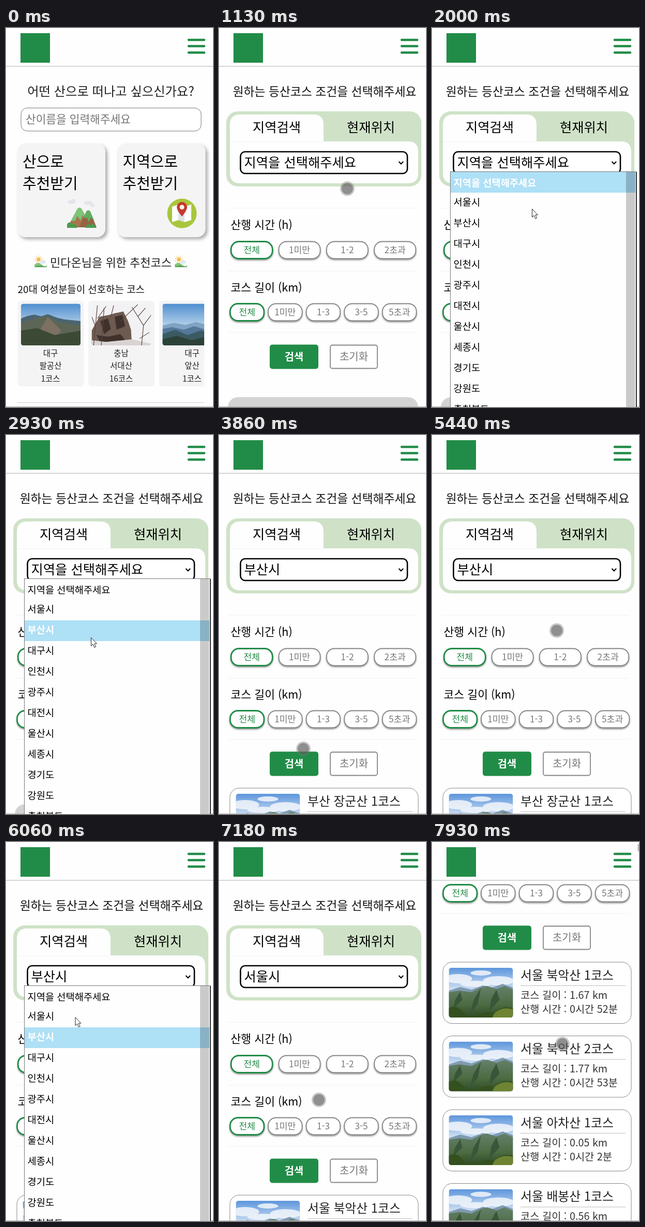
An HTML page that plays this animation: 400x732 px, repeating every 7990 ms.

```html
<!DOCTYPE html>
<html lang="ko">
<head>
<meta charset="utf-8">
<title>등산코스 추천</title>
<style>
  html, body { margin: 0; width: 100%; height: 100%; overflow: hidden; background: #fefefe; }
  #stage { display: block; width: 100vw; height: 100vh; }
  text { font-family: "Noto Sans CJK KR", "Noto Sans CJK", "Noto Sans", sans-serif; white-space: pre; }
  .soft { filter: drop-shadow(0 2px 1.5px rgba(0, 0, 0, .4)); }
  .raised { filter: drop-shadow(4px 4px 3px rgba(0, 0, 0, .32)); }
</style>
</head>
<body>
<svg id="stage" viewBox="0 0 400 732"></svg>
<script>
const LOOP = 7990;
const GREEN = '#218c47';
const stage = document.getElementById('stage');

// Text is placed by the vertical centre of its glyphs.
const text = (x, cy, size, str, { at = 'start', weight = 400, fill = '#111' } = {}) =>
  `<text x="${x}" y="${(cy + size * .38).toFixed(1)}" font-size="${size}" text-anchor="${at}" font-weight="${weight}" fill="${fill}">${str}</text>`;
const rect = (x, y, w, h, r, attrs) =>
  `<rect x="${x}" y="${y}" width="${w}" height="${h}" rx="${r}" ${attrs}/>`;
const line = (x1, y, x2, color, width = 1) =>
  `<path d="M${x1} ${y}H${x2}" stroke="${color}" stroke-width="${width}"/>`;
const shape = (d, fill) => `<path d="${d}" fill="${fill}"/>`;
const group = (id, body) => `<g id="${id}">${body}</g>`;
const photo = (x, y, w, h, body) =>
  `<svg x="${x}" y="${y}" width="${w}" height="${h}" viewBox="0 0 124 96" preserveAspectRatio="none"><g clip-path="url(#round)">${body}</g></svg>`;

const defs = `<defs>
  <clipPath id="round"><rect width="124" height="96" rx="5"/></clipPath>
  <linearGradient id="sky" x2="0" y2="1"><stop stop-color="#5d96dc"/><stop offset=".5" stop-color="#dfeaf6"/></linearGradient>
  <linearGradient id="ridge" x2="0" y2="1"><stop stop-color="#64806a"/><stop offset=".6" stop-color="#4c6b41"/><stop offset="1" stop-color="#2f4a25"/></linearGradient>
  <linearGradient id="haze" x2="0" y2="1"><stop stop-color="#4f8fd0"/><stop offset=".55" stop-color="#b9d3ea"/></linearGradient>
</defs>`;

const valley = rect(0, 0, 124, 96, 0, 'fill="url(#sky)"') +
  `<g fill="#f3f6fb" opacity=".85"><ellipse cx="18" cy="21" rx="27" ry="9"/><ellipse cx="62" cy="10" rx="20" ry="5"/>
   <ellipse cx="96" cy="25" rx="30" ry="9"/><ellipse cx="52" cy="31" rx="30" ry="6"/></g>` +
  shape('M0 44L22 37 44 42 66 34 84 38 104 31 124 38V96H0Z', '#7f9bb0') +
  shape('M0 47L20 44 44 47 62 38 74 35 92 41 108 35 124 42V96H0Z', 'url(#ridge)') +
  shape('M62 39L48 62 40 90 56 70ZM92 42L82 60 78 84 98 62ZM22 46L12 62 8 80 26 62Z', '#39563a') +
  shape('M0 78Q14 70 26 84T58 90 88 88Q100 72 124 78V96H0Z', '#34501f') +
  shape('M88 88Q102 74 124 80V96H84Z', '#6f8433');

const brownRidge = rect(0, 0, 124, 96, 0, 'fill="url(#haze)"') +
  shape('M0 34L14 28 28 25 42 29 56 24 74 32 90 36 124 40V96H0Z', '#4b6470') +
  shape('M0 44L30 34 52 28 78 42 124 50V96H0Z', '#5d6656') +
  shape('M40 60L56 30 84 62 70 80Z', '#7c7162') +
  shape('M0 62L34 56 70 72 124 62V96H0Z', '#3c4a35');

const rock = rect(0, 0, 124, 96, 0, 'fill="#f2f1f3"') +
  shape('M0 62L16 30 36 26 48 22 66 18 76 40 82 60 84 96H0Z', '#6d5a50') +
  shape('M18 40L34 34 40 58 26 70ZM48 30L64 26 70 52 52 60ZM10 72L34 76 60 70 74 90 20 94Z', '#3f312c') +
  shape('M0 84L30 88 84 82 124 92V96H0Z', '#d9d3d2') +
  `<path d="M4 96L12 4M12 34L30 6M8 52L0 30M20 96L26 10M60 40L96 2M104 96L108 50 84 8M108 50L124 26M96 30L112 10M100 80L120 66M40 30L46 4"
    fill="none" stroke="#5a463f" stroke-width="1.3"/>`;

const blueRidge = rect(0, 0, 124, 96, 0, 'fill="url(#haze)"') +
  shape('M0 50L24 44 48 49 70 42 96 50 124 44V96H0Z', '#7fa3c2') +
  shape('M0 58L20 54 44 60 66 52 90 60 124 54V96H0Z', '#54789a') +
  shape('M0 70L26 60 52 72 80 62 124 74V96H0Z', '#3b5a62') +
  shape('M0 82L30 74 60 84 90 76 124 84V96H0Z', '#2c4238');

// Home page
const weatherIcon = x => `<g transform="translate(${x} 440)">
  <circle cx="8" cy="7" r="6.5" fill="none" stroke="#f7d58a" stroke-width="2" stroke-dasharray="2 2"/>
  <circle cx="8" cy="7" r="4" fill="#f6bd4f"/>
  ${shape('M11 13a3 3 0 0 1 3-4 4 4 0 0 1 7 2 2.500 2.500 0 0 1 0 4H12Z', '#dfe9f2')}
  ${shape('M0 22V17Q7 10 14 17T24 17V22Z', '#86c57a')}${shape('M0 22Q8 15 24 22Z', '#5aa55b')}</g>`;

const peakIcon = `<g transform="translate(117 329)">
  <g fill="#e3e5ea"><ellipse cx="10" cy="7" rx="8" ry="3.500"/><ellipse cx="13" cy="4" rx="4" ry="3"/>
  <ellipse cx="42" cy="9" rx="9" ry="4"/><ellipse cx="50" cy="14" rx="5" ry="3"/></g>
  ${shape('M2 56L20 22Q25 14 30 22L48 56Z', '#a9754f')}${shape('M24 56L38 26Q42 20 46 26L58 56Z', '#976443')}
  ${shape('M9 43L20 22Q25 14 30 22L37 38 31 33 27 43 21 34 16 44Z', '#7cc576')}
  ${shape('M33 38L38 26Q42 20 46 26L53 42 47 37 43 46 39 37Z', '#5faf62')}
  ${shape('M1 57V50Q6 42 12 51 17 45 21 57ZM36 57Q40 46 46 52 52 44 57 57Z', '#4d9a50')}</g>`;

const mapIcon = `<circle cx="340" cy="358" r="28.500" fill="#a8c63d"/>
  ${shape('M321 345L333 341V371L321 375Z M345 345L358 341V371L345 375Z', '#fff')}${shape('M333 341L345 345V375L333 371Z', '#dde3e8')}
  ${shape('M340 364Q330 352 330 346A10 10 0 0 1 350 346Q350 352 340 364Z', '#c8372d')}
  <circle cx="340" cy="346" r="4.500" fill="#f7f1ee"/>`;

const bigCard = (x, title) => rect(x, 223, 170.5, 181, 16, 'fill="#f4f4f4" class="raised"') +
  text(x + 10.5, 258, 29, title, { weight: 500, fill: '#000' }) +
  text(x + 10.5, 300, 29, '추천받기', { weight: 500, fill: '#000' });

const courseCard = (x, picture, labels) => rect(x, 527, 128, 165, 6, 'fill="#f4f4f4"') +
  photo(x + 6.5, 532.5, 115, 80.5, picture) +
  labels.map((s, i) => text(x + 63.5, 628 + i * 24.5, 15.5, s, { at: 'middle', fill: '#222' })).join('');

const home = group('home',
  text(202.5, 122, 24.3, '어떤 산으로 떠나고 싶으신가요?', { at: 'middle', fill: '#222' }) +
  rect(29, 154.5, 348, 44.5, 12, 'fill="#fff" stroke="#777"') +
  text(38, 176, 21.4, '산이름을 입력해주세요', { weight: 300, fill: '#757575' }) +
  bigCard(21.5, '산으로') + bigCard(215, '지역으로') + peakIcon + mapIcon +
  weatherIcon(55) + weatherIcon(326) +
  text(202.5, 453, 22, '민다온님을 위한 추천코스', { at: 'middle', fill: '#222' }) +
  text(22.5, 505, 18.9, '20대 여성분들이 선호하는 코스') +
  `<svg width="383" height="732">${
    courseCard(22.5, brownRidge, ['대구', '팔공산', '1코스']) +
    courseCard(159, rock, ['충남', '서대산', '16코스']) +
    courseCard(296, blueRidge, ['대구', '앞산', '1코스'])}</svg>` +
  line(22, 723.5, 383, '#ccc'));

// Search page
const chips = (xs, y, w, labels) => labels.map((label, i) => {
  const stroke = i ? 'stroke="#858585" stroke-width="1.800"' : `stroke="${GREEN}" stroke-width="2.800"`;
  return rect(xs + i * (w.pitch), y, w.size, 33, 15, `fill="#fff" ${stroke} class="soft"`) +
    text(xs + i * w.pitch + w.size / 2, y + 15.5, 17.2, label,
      { at: 'middle', weight: i ? 400 : 500, fill: i ? '#777' : GREEN });
}).join('');

const resultCard = ([title, length, time], i) => `<g transform="translate(0 ${682 + i * 142.5})">` +
  rect(21, 0, 364, 118.5, 18, 'fill="#fff" stroke="#888"') +
  photo(32.5, 11, 124, 96, valley) +
  text(171, 24.5, 23.8, title, { fill: '#222' }) + line(171, 45.5, 374, '#bbb') +
  text(171, 63, 19.8, `코스 길이 : ${length} km`, { weight: 300, fill: '#333' }) +
  text(171, 90, 19.8, `산행 시간 : 0시간 ${time}분`, { weight: 300, fill: '#333' }) + '</g>';

const busan = [['부산 장군산 1코스', '0.05', 2], ['부산 천마산 1코스', '1.08', 33]];
const seoul = [['서울 북악산 1코스', '1.67', 52], ['서울 북악산 2코스', '1.77', 53],
  ['서울 아차산 1코스', '0.05', 2], ['서울 배봉산 1코스', '0.56', 17]];
const regions = ['지역을 선택해주세요', '서울시', '부산시', '대구시', '인천시', '광주시',
  '대전시', '울산시', '세종시', '경기도', '강원도', '충청북도'];
const selectLabel = i => group('select' + i, text(48.5, 259, 25.3, regions[i], { weight: 500, fill: '#000' }));

const search = group('search', group('page',
  text(204, 122, 22.8, '원하는 등산코스 조건을 선택해주세요', { at: 'middle', weight: 500 }) +
  rect(14, 161, 377, 145, 22, 'fill="#cfe2c7"') +
  shape('M21 219V187Q21 167 41 167H182Q202 167 202 187V219H365Q385 219 385 239V280Q385 300 365 300H41Q21 300 21 280Z', '#fefefe') +
  line(21, 219.5, 202, '#f3f3f3') +
  text(111.5, 191, 25.3, '지역검색', { at: 'middle', weight: 500, fill: '#000' }) +
  text(293.5, 191, 25.3, '현재위치', { at: 'middle', weight: 500, fill: '#000' }) +
  rect(41.5, 239, 322.5, 42, 9, 'fill="#fff" stroke="#000" stroke-width="2.600"') +
  selectLabel(0) + selectLabel(1) + selectLabel(2) +
  '<path d="M347.500 258l4.300 4.500 4.300-4.500" fill="none" stroke="#000" stroke-width="2"/>' +
  [348, 470, 588].map(y => line(17, y, 382, '#f0f0f0')).join('') +
  text(22.5, 380, 21.6, '산행 시간 (h)', { weight: 500, fill: '#000' }) +
  chips(23.3, 412.5, { size: 80, pitch: 92.3 }, ['전체', '1미만', '1-2', '2초과']) +
  text(22.5, 501, 21.6, '코스 길이 (km)', { weight: 500, fill: '#000' }) +
  chips(21.5, 532.5, { size: 65.5, pitch: 73.6 }, ['전체', '1미만', '1-3', '3-5', '5초과']) +
  rect(98, 611.5, 94, 47, 5, `fill="${GREEN}"`) +
  text(145, 634, 19.8, '검색', { at: 'middle', weight: 700, fill: '#fff' }) +
  rect(215, 612.5, 91, 45, 4, 'fill="#fff" stroke="#858585" stroke-width="1.800"') +
  text(260.5, 634, 20, '초기화', { at: 'middle', fill: '#777' }) +
  group('empty', rect(17, 713, 368, 60, 20, 'fill="#d3d3d3"')) +
  group('busan', busan.map(resultCard).join('')) +
  group('seoul', seoul.map(resultCard).join(''))));

const header = rect(0, 0, 400, 74, 0, 'fill="#fefefe"') + line(0, 74, 400, '#d6d6d6', 2) +
  rect(28, 10, 57, 57, 0, `fill="${GREEN}"`) +
  [23, 35, 47.5].map(y => `<path d="M353 ${y}H383" stroke="${GREEN}" stroke-width="4.500" stroke-linecap="round"/>`).join('') +
  group('thumb', rect(397.5, 4, 2.5, 14, 0, 'fill="#b8b8b8"')) +
  line(0, 731.5, 400, '#b5b5b5');

// Open region list
const rowCentre = i => i ? 296 + i * 40 : 299;
const highlight = i => group('row' + i,
  rect(36, 278 + i * 40, 339, 40, 0, 'fill="#aee0f6"') +
  rect(375, 278 + i * 40, 18, 40, 0, 'fill="#89b1c5"') +
  text(41.5, rowCentre(i), 18.7, regions[i], { weight: 700, fill: '#fff' }));
const list = group('list',
  rect(35.5, 277.5, 359, 470, 0, 'fill="#fefefe" stroke="#777"') +
  '<path d="M395 278V732" stroke="#000" stroke-width="1.500"/>' +
  rect(375, 278, 17.5, 460, 0, 'fill="#cacaca"') +
  regions.map((s, i) => text(41.5, rowCentre(i), 18.7, s, { weight: 500, fill: '#000' })).join('') +
  highlight(0) + highlight(1) + highlight(2));

const touch = group('touch', '<circle r="14" fill="#777" fill-opacity=".4"/><circle r="11" fill="#555" fill-opacity=".5"/>');
const arrow = group('arrow', '<path d="M.500 .500V16.500L4 13 6.800 19.300 9.500 18 6.800 12H11.500Z" fill="#fff" stroke="#222"/>');

stage.innerHTML = defs + rect(0, 0, 400, 732, 0, 'fill="#fefefe"') + home + search + header + list + touch + arrow;

// Timing
const play = (id, frames) =>
  document.getElementById(id).animate(frames, { duration: LOOP, iterations: Infinity });

function show(id, ...spans) {
  const key = (ms, opacity) => ({ offset: ms / LOOP, opacity, easing: 'steps(1, end)' });
  const frames = spans.flatMap(([from, to]) => [key(from, 1), key(to, 0)]);
  if (spans[0][0] > 0) frames.unshift(key(0, 0));
  if (spans.at(-1)[1] < LOOP) frames.push(key(LOOP, 0));
  play(id, frames);
}

function move(id, steps) {
  const all = [[0, ...steps[0].slice(1)], ...steps, [LOOP, ...steps.at(-1).slice(1)]];
  play(id, all.map(([ms, x, y]) =>
    ({ offset: ms / LOOP, transform: `translate(${x}px, ${y}px)`, easing: 'ease-in-out' })));
}

show('home', [0, 260]);
show('search', [260, LOOP]);
show('select0', [0, 3070]);
show('select2', [3070, 6590]);
show('select1', [6590, LOOP]);
show('empty', [0, 3790]);
show('busan', [3790, 7000]);
show('seoul', [7000, LOOP]);
show('list', [1680, 3070], [5840, 6590]);
show('row0', [1680, 2870]);
show('row2', [2870, 3070], [5840, 6300]);
show('row1', [6300, 6590]);
show('arrow', [1680, 3070], [5840, 6590]);
show('touch', [70, 1680], [3070, 5840], [6590, LOOP]);
show('thumb', [4560, 5320], [7250, LOOP]);

move('page', [
  [4560, 0, 0], [4840, 0, -225], [4980, 0, -225], [5320, 0, 0],
  [7250, 0, 0], [7450, 0, -225], [7700, 0, -225], [7930, 0, -450]]);
move('touch', [
  [800, 279, 345], [1530, 205, 262], [1680, 205, 262],
  [3070, 164, 392], [3720, 163, 606], [4060, 163, 606], [4130, 163, 609], [4320, 163, 609],
  [4560, 250, 398], [4840, 264, 173], [4980, 264, 173], [5320, 250, 398], [5770, 190, 262], [5840, 190, 262],
  [6590, 125, 345], [6900, 150, 630], [7000, 150, 630], [7180, 193, 498],
  [7250, 193, 498], [7450, 225, 273], [7510, 225, 273], [7700, 230, 615], [7930, 252, 390]]);
move('arrow', [
  [1680, 205, 262], [2000, 193, 349], [2340, 179, 344], [2470, 179, 344], [2600, 164, 391], [3070, 164, 391],
  [5840, 190, 262], [6060, 133.5, 338], [6500, 125, 345]]);
</script>
</body>
</html>
```
